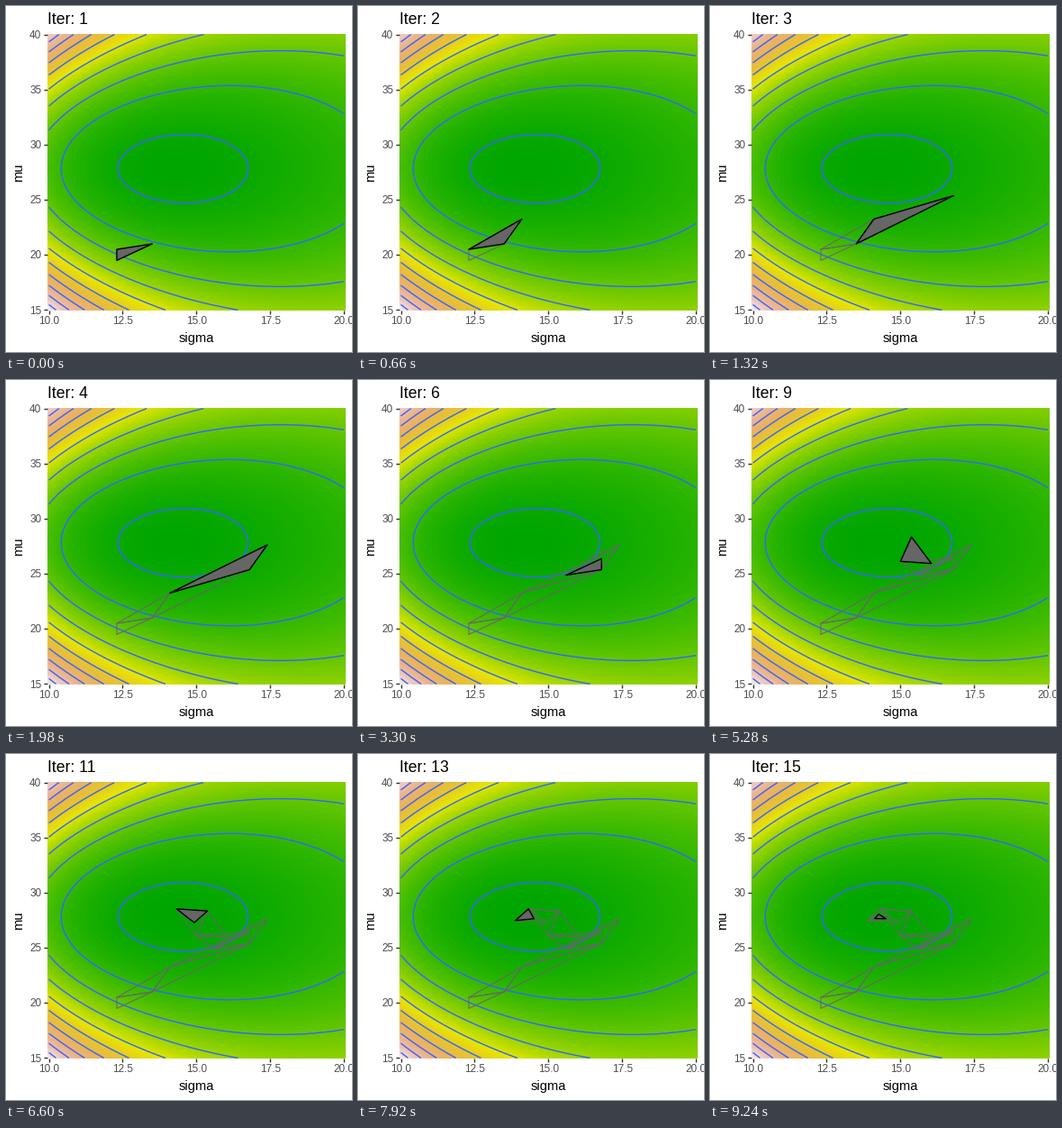
These frames come from a looping animation (384 px wide and 384 px high, 9.9 s). A matplotlib script:

```python
import numpy as np
import matplotlib.pyplot as plt
from matplotlib.animation import FuncAnimation
from matplotlib.colors import LinearSegmentedColormap
from matplotlib.patches import Polygon

SIZE, DPI = 384, 96
STEPS, INTERVAL = 15, 660
LEFT, RIGHT, TOP, BOTTOM = 46, 376.67, 31, 338   # panel edges in px
LINE = 1.067                                     # default line width in pt
CELL = 0.1
MEAN, VAR = 27.825, 203.5                        # sample moments
TERRAIN = ["#00A600", "#2DB600", "#63C600", "#A0D600", "#E6E600",
           "#E8C32E", "#EBB25E", "#EDB48E", "#F0C9C0", "#F2F2F2"]

plt.rcParams["font.family"] = "Liberation Sans"


def loss(sigma, mu):
    """Mean negative log-likelihood of a normal sample."""
    return (np.log(sigma) + 0.5 * np.log(2 * np.pi)
            + (VAR + (mu - MEAN) ** 2) / (2 * sigma ** 2))


def nelder_mead(simplex, steps):
    """Return the simplex at every iteration."""
    pts = [np.array(p) for p in simplex]
    path = [np.array(pts)]
    while len(path) < steps:
        pts.sort(key=lambda p: loss(*p))
        best, second, worst = pts
        mid = (best + second) / 2
        refl = 2 * mid - worst
        if loss(*refl) < loss(*best):
            far = 3 * mid - 2 * worst
            new = far if loss(*far) < loss(*refl) else refl
        elif loss(*refl) < loss(*second):
            new = refl
        elif loss(*refl) < loss(*worst):
            new = (mid + refl) / 2
        else:
            new = (mid + worst) / 2
        pts = [best, second, new]
        path.append(np.array(pts))
    return path


path = nelder_mead([(12.3, 20.5), (13.5, 21.0), (12.3, 19.5)], STEPS)

fig = plt.figure(figsize=(SIZE / DPI, SIZE / DPI), dpi=DPI, facecolor="white")
ax = fig.add_axes([LEFT / SIZE, 1 - BOTTOM / SIZE,
                   (RIGHT - LEFT) / SIZE, (BOTTOM - TOP) / SIZE])

# Likelihood surface
sigma = np.linspace(10, 20, 101)
mu = np.linspace(15, 40, 251)
surface = loss(*np.meshgrid(sigma, mu))
half = CELL / 2
extent = (10 - half, 20 + half, 15 - half, 40 + half)
cmap = LinearSegmentedColormap.from_list("terrain10", TERRAIN, N=1024)
ax.imshow(surface, cmap=cmap, extent=extent, origin="lower",
          aspect="auto", interpolation="nearest", zorder=0)
ax.contour(sigma, mu, surface, levels=np.arange(4.1, 5.05, 0.1),
           colors="#3366FF", linewidths=LINE, zorder=1)
ax.set(xlim=extent[:2], ylim=extent[2:])

# Axes and labels
xticks, yticks = np.arange(10, 20.1, 2.5), np.arange(15, 41, 5)
ax.set_xticks(xticks, [])
ax.set_yticks(yticks, [])
ax.tick_params(length=2.75, width=LINE, color="#333333")
for spine in ax.spines.values():
    spine.set_visible(False)


def label(x, y, text, size, color="black", **kw):
    return fig.text(x / SIZE, 1 - y / SIZE, text, fontsize=size, color=color,
                    va="baseline", **kw)


def to_px(value, lo, hi, start, end):
    return start + (value - lo) / (hi - lo) * (end - start)


for v in xticks:
    label(to_px(v, *extent[:2], LEFT, RIGHT), 353, f"{v:.1f}", 8.8,
          "#4D4D4D", ha="center")
for v in yticks:
    label(39.4, to_px(v, *extent[2:], BOTTOM, TOP) + 4.2, f"{v:d}", 8.8,
          "#4D4D4D", ha="right")
label((LEFT + RIGHT) / 2, 373, "sigma", 11, ha="center")
fig.text(18 / SIZE, 1 - (TOP + BOTTOM) / 2 / SIZE, "mu", fontsize=11,
         rotation=90, rotation_mode="anchor", ha="center", va="baseline")
title = label(LEFT, 20, "", 13.2, ha="left")

# Simplex and its trail
trail = [ax.add_patch(Polygon(p, fill=False, ec="#666666", lw=0.78,
                              joinstyle="round", zorder=2)) for p in path]
current = ax.add_patch(Polygon(path[0], fc="#666666", ec="black", lw=LINE,
                               joinstyle="round", zorder=3))


def update(i):
    title.set_text(f"Iter: {i + 1}")
    current.set_xy(path[i])
    for k, ghost in enumerate(trail):
        ghost.set_visible(k < i)
    return [title, current, *trail]


anim = FuncAnimation(fig, update, frames=STEPS, interval=INTERVAL,
                     repeat=True, repeat_delay=0, blit=False)
plt.show()
```
